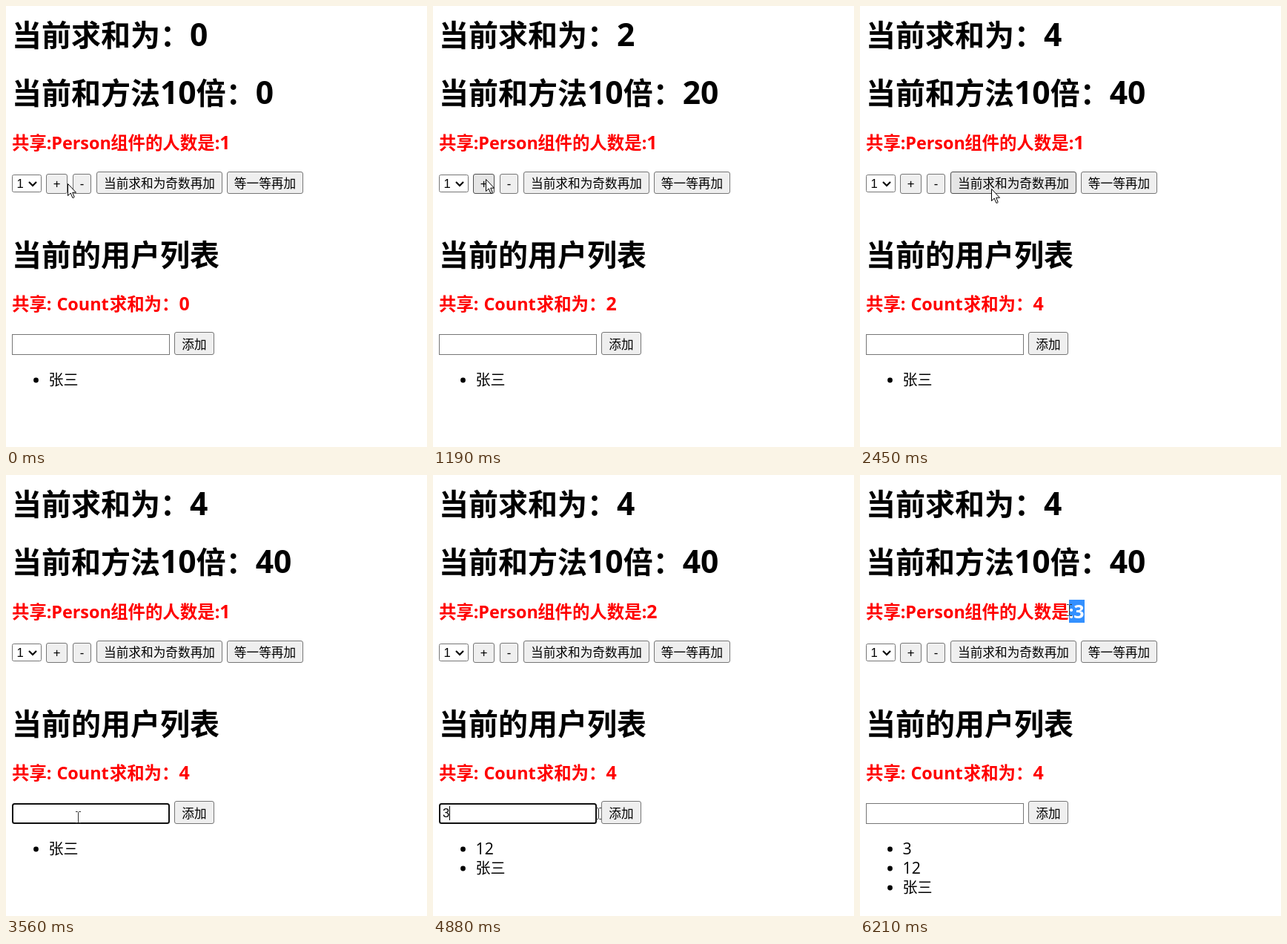
These frames come from a looping animation (568x594 px, 6.31 s). An HTML page:

```html
<!DOCTYPE html>
<html lang="zh-CN">
<head>
<meta charset="utf-8">
<title>Count / Person</title>
<style>
html, body { margin: 0; width: 100%; height: 100%; overflow: hidden; background: #fff; }
svg { display: block; width: 568px; height: 594px; }
text { white-space: pre; }
.cjk { font-family: "Noto Sans CJK SC", "Noto Sans CJK", "Noto Sans CJK JP", sans-serif; font-weight: 350; }
.lat { font-family: "Open Sans", "Noto Sans", sans-serif; }
.ui { font-family: "Liberation Sans", Arial, sans-serif; font-size: 16.67px; }
.bold { font-weight: 700; }
.red { fill: #f00; }
</style>
</head>
<body>
<svg id="stage" viewBox="0 0 568 594"></svg>
<script>
const LOOP = 6310;
const LEFT = 8;
const NS = "http://www.w3.org/2000/svg";
const stage = document.getElementById("stage");

const set = (el, attrs) => { for (const k in attrs) el.setAttribute(k, attrs[k]); };
function add(tag, attrs, content = "", parent = stage) {
  const el = document.createElementNS(NS, tag);
  set(el, attrs);
  el.textContent = content;
  return parent.appendChild(el);
}
const show = (el, on) => set(el, { visibility: on ? "visible" : "hidden" });
const inside = (b, x, y) => x >= b.x && x < b.x + b.w && y >= b.y && y < b.y + b.h;

// Latin glyphs come from another face; its digits need a slightly larger size
function run(x, y, size, str, style = "", parent = stage) {
  const face = /^[ -~]/.test(str) ? "lat" : "cjk";
  const scale = /^\d/.test(str) ? 1.065 : 1;
  return add("text", { x, y, "font-size": size * scale, class: `${face} ${style}` }, str, parent);
}

// A heading is a row of runs; its box shows the text pointer
const textBoxes = [];
function heading(y, size, style, w, ...runs) {
  textBoxes.push({ x: LEFT, y: y - size, w, h: size * 1.3 });
  return runs.map(([x, str]) => run(x, y, size, str, "bold " + style));
}
const mark = add("rect", { y: 168, height: 31, fill: "#3390ff" });
const [, sum] = heading(54, 40, "", 264, [LEFT, "当前求和为："], [248, "0"]);
const [, , , tenfold] = heading(132, 40, "", 378,
  [LEFT, "当前和方法"], [208, "10"], [256.8, "倍："], [336.8, "0"]);
const [, , , , colon, people] = heading(192.5, 23.4, "red", 302,
  [LEFT, "共享"], [54.8, ":"], [61.2, "Person"], [141.2, "组件的人数是"], [281.8, ":"], [288.3, "1"]);
heading(349.5, 40, "", 280, [LEFT, "当前的用户列表"]);
const [, , , , shared] = heading(410, 23.4, "red", 240,
  [LEFT, "共享"], [54.8, ":"], [68.4, "Count"], [139.8, "求和为："], [233.5, "0"]);

add("rect", { x: 8.5, y: 227.5, width: 39, height: 23, rx: 2, fill: "#fff", stroke: "#767676" });
add("text", { x: 14.5, y: 245, class: "ui" }, "1");
add("path", { d: "M31 237l5 5 5-5", fill: "none", stroke: "#000", "stroke-width": 2.2 });

function button(x, y, w, h, str, cls = "cjk") {
  const rect = add("rect", { x: x + .5, y: y + .5, width: w - 1, height: h - 1, rx: 2.5 });
  const drop = cls === "ui" ? 5.5 : 7;
  add("text", { x: x + w / 2, y: y + h / 2 + drop, class: cls, "font-size": 16.67, "text-anchor": "middle" }, str);
  return { x, y, w, h, rect };
}
const buttons = [
  button(54, 226, 29, 27, "+", "ui"),
  button(90, 226, 25, 27, "-", "ui"),
  button(122, 223, 170, 30, "当前求和为奇数再加"),
  button(298, 223, 103, 30, "等一等再加"),
  button(227, 439, 54, 31, "添加")
];

const input = { x: LEFT, y: 442, w: 217, h: 28 };
textBoxes.push(input);
const field = add("rect", { fill: "#fff" });
const typed = add("text", { x: 13, y: 461, class: "ui" });
const caret = add("path", { stroke: "#000" });

const rows = ["3", "12", "张三"].map(str => {
  const g = add("g", {});
  add("circle", { cx: 40.5, cy: 504, r: 3.4 }, "", g);
  run(57.5, 511, 20, str, "", g);
  return g;
});

const arrow = add("path", {
  d: "M.5 .5V16.5L4.2 13 6.8 19.2Q8 20 9.2 18.3L6.7 12.2H11.5Z",
  fill: "#fff", stroke: "#000", "stroke-linejoin": "round"
});
const beam = add("path", {
  d: "M-3.5-7.5H-1L0-6.5 1-7.5H3.5M0-6.5V6.5M-3.5 7.5H-1L0 6.5 1 7.5H3.5",
  fill: "none", stroke: "#333"
});

// The pointer rests, then eases to each stop
const moves = [
  { from: 60, to: 200, x: 71, y: 233 },
  { from: 1860, to: 2090, x: 180, y: 237 },
  { from: 2380, to: 2960, x: 97, y: 461 },
  { from: 3760, to: 3980, x: 246, y: 452 },
  { from: 4200, to: 4400, x: 195, y: 461 },
  { from: 4780, to: 4980, x: 250, y: 452 },
  { from: 5400, to: 5600, x: 285, y: 240 },
  { from: 5660, to: 6100, x: 306, y: 180 },
  { from: 6150, to: 6210, x: 282, y: 182 }
];
const HOLD = 80, KEY = 120, BLINK = 500;
const counts = [500, 940, 1400, 2340];
const entries = [
  { focus: 3060, key: 3620, text: "12", sent: 4140 },
  { focus: 4560, key: 4850, text: "3", sent: 5210 }
];
const sends = entries.map(e => e.sent);
const past = (times, t) => times.filter(v => t >= v).length;

function pointer(t) {
  let x = 83, y = 239;
  for (const m of moves) {
    const k = Math.min(1, Math.max(0, (t - m.from) / (m.to - m.from)));
    const ease = k * k * (3 - 2 * k);
    x += (m.x - x) * ease;
    y += (m.y - y) * ease;
  }
  return [x, y];
}

function drawField(t) {
  const e = entries.find(e => t >= e.focus && t < e.sent);
  const active = e && t < e.sent - HOLD;
  const n = e ? Math.min(e.text.length, Math.max(0, Math.floor((t - e.key) / KEY) + 1)) : 0;
  set(field, active
    ? { x: 9, y: 443, width: 211, height: 26, rx: 2.5, stroke: "#101010", "stroke-width": 2 }
    : { x: 8.5, y: 442.5, width: 212, height: 27, rx: 0, stroke: "#767676", "stroke-width": 1 });
  typed.textContent = e ? e.text.slice(0, n) : "";
  const since = n ? e.key + (n - 1) * KEY : e ? e.focus : 0;
  set(caret, { d: `M${Math.round(13 + 9.27 * n) + .5} 446V465` });
  show(caret, active && (t - since) % (2 * BLINK) < BLINK);
}

function draw(t) {
  const [px, py] = pointer(t);
  const down = [...counts, ...sends].some(up => t >= up - HOLD && t < up);
  for (const b of buttons) {
    const [fill, stroke] = !inside(b, px, py) ? ["#efefef", "#767676"]
      : down ? ["#f5f5f5", "#8d8d8d"] : ["#e5e5e5", "#4f4f4f"];
    set(b.rect, { fill, stroke });
  }

  const n = past(counts, t), added = past(sends, t);
  sum.textContent = shared.textContent = n;
  tenfold.textContent = n * 10;
  people.textContent = 1 + added;
  rows.forEach((g, i) => {
    const slot = i - 2 + added;
    set(g, { transform: `translate(0 ${26 * slot})` });
    show(g, slot >= 0);
  });
  drawField(t);

  const left = t >= 6210 ? 282 : t >= 6160 ? 288 : 303;
  set(mark, { x: left, width: 303 - left });
  people.style.fill = left < 303 ? "#fff" : "";
  colon.style.fill = left < 288 ? "#fff" : "";

  const overText = textBoxes.some(b => inside(b, px, py));
  const x = Math.round(px), y = Math.round(py);
  set(arrow, { transform: `translate(${x} ${y})` });
  set(beam, { transform: `translate(${x + .5} ${y})` });
  show(arrow, !overText);
  show(beam, overText);
}

const start = performance.now();
function tick() {
  draw((performance.now() - start) % LOOP);
  requestAnimationFrame(tick);
}
tick();
</script>
</body>
</html>
```
